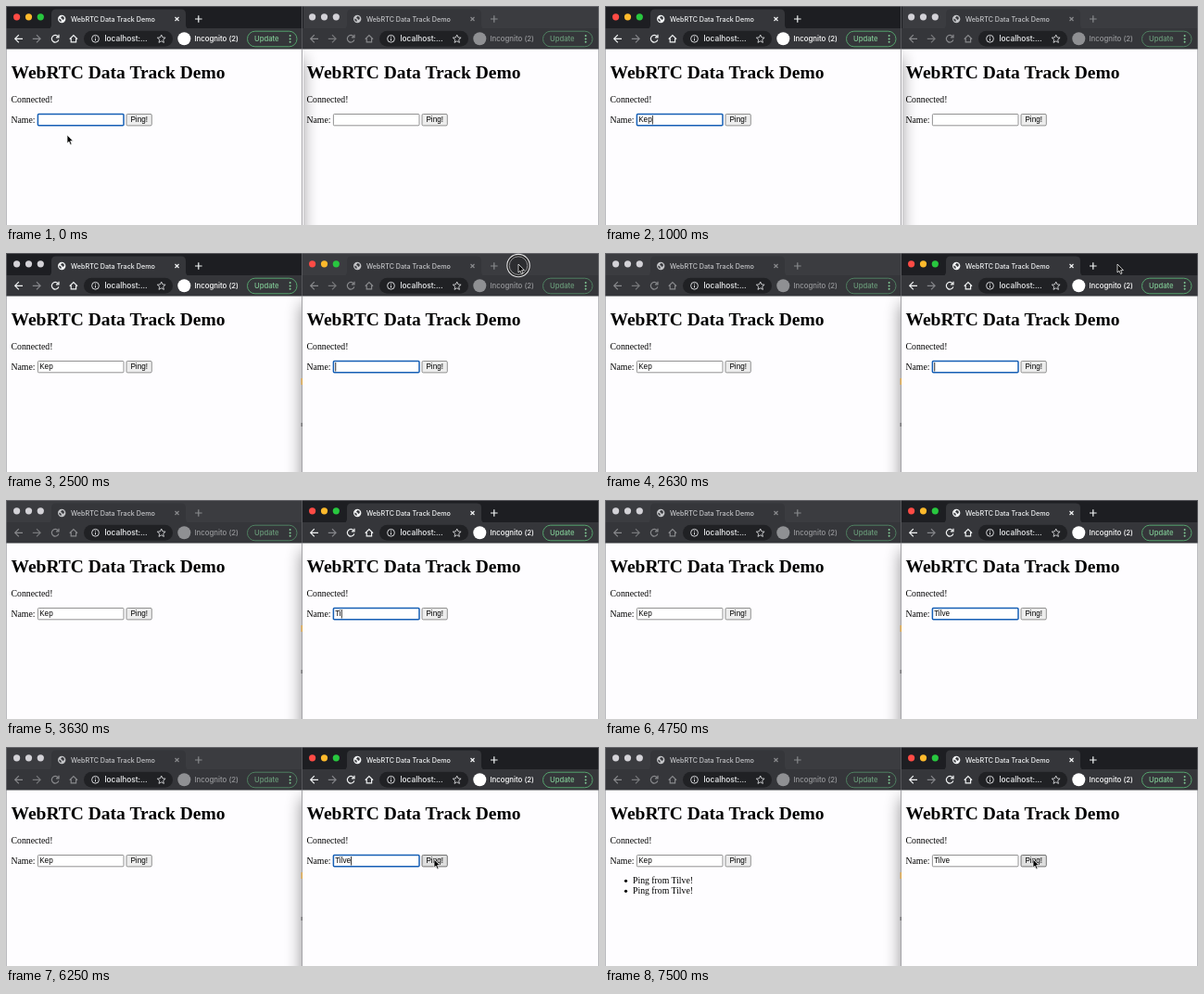
Write an HTML page that moves like this. It is 640 px wide and 236 px high and loops after 8 s.

```html
<!DOCTYPE html>
<html lang="en">
<head>
<meta charset="utf-8">
<title>WebRTC Data Track Demo</title>
<style>
  html, body { margin: 0; width: 100%; height: 100%; overflow: hidden; background: #fefdff; }
  svg { display: block; width: 640px; height: 236px; }
  text { white-space: pre; }
  .ui { font-family: Inter, Roboto, sans-serif; font-weight: 500; }
  .page { font: 9.75px "Liberation Serif", "Times New Roman", serif; fill: #000; }
  .page .h1 { font-size: 19.5px; font-weight: 700; }
  .page .ctl { font: 8.15px "Liberation Sans", Arial, sans-serif; }

  .win { --strip: #3b3c40; --tab: #35363a; --title: #c3c4c7; --icon: #88898c; --dim: #77787b;
         --badge: #8f9093; --label: #97989b; --green: #6a9a79; --edge: #4f8061; }
  .win.active { --strip: #1d1e22; --title: #f1f3f4; --icon: #f1f3f4; --dim: #85868a;
         --badge: #fff; --label: #fff; --green: #81c995; --edge: #55a36d; }
  .strip { fill: var(--strip); }
  .tab { fill: var(--tab); }
  .title { fill: var(--title); font-size: 7.2px; }
  .line { fill: none; stroke: var(--icon); stroke-width: 1.2; }
  .line.dim { stroke: var(--dim); }
  .label { fill: var(--label); font-size: 7.8px; }
  .green { fill: var(--green); font-size: 7.7px; }
  .light { fill: #d3d2d7; }
  .front .light.r { fill: #fe4b45; }
  .front .light.y { fill: #fdb92c; }
  .front .light.g { fill: #28c73f; }
  .shadow { display: none; }
  .front .shadow { display: inline; }
  .box { fill: #fff; stroke: #767676; stroke-width: .8; }
  .focus .box { stroke: #165fb5; stroke-width: 1.5; }
  .btn { fill: #ededed; stroke: #767676; stroke-width: .8; }
  .hover .btn { fill: #dedede; stroke: #555; }
  .press .btn { fill: #cfcfcf; }
</style>
</head>
<body>
<svg id="stage" viewBox="0 0 640 236" xmlns="http://www.w3.org/2000/svg">
  <defs>
    <filter id="soft" x="-20%" y="-20%" width="140%" height="140%"><feGaussianBlur stdDeviation="9"/></filter>
    <clipPath id="pane"><rect width="321" height="236"/></clipPath>
  </defs>
  <rect width="640" height="236" fill="#fefdff"/>
  <g id="windows"></g>
  <g id="seam">
    <rect x="319" y="0" width="1" height="46.5" fill="#55565a"/>
    <rect x="319" y="46.5" width="1" height="189.5" fill="#a3a2a6"/>
    <g id="specks">
      <rect x="318.6" y="135" width="1.4" height="7" fill="#dca648"/>
      <rect x="318.6" y="183" width="1.4" height="4" fill="#6d6c70"/>
    </g>
  </g>
  <rect x=".5" y=".5" width="639" height="240" fill="none" stroke="#85868a" stroke-opacity=".55"/>
  <g id="pointer">
    <g id="ring" fill="none">
      <circle cy="1.6" r="11" fill="#000" fill-opacity=".25" stroke="#222" stroke-width="3"/>
      <circle cy="1.6" r="12.2" stroke="#e4e4e6" stroke-width="1.1"/>
      <circle cy="1.6" r="9.8" stroke="#b4b4b8" stroke-width=".8"/>
    </g>
    <path d="M0 0V9L2 7.2 3.5 10.6 5 10 3.6 6.6H6.4Z" fill="#000" stroke="#eee" stroke-width=".8"/>
  </g>
</svg>
<script>
const LOOP = 8000, TICK = 125;
const $ = id => document.getElementById(id);
const NS = 'http://www.w3.org/2000/svg';

const light = (x, c) => `<circle class="light ${c}" cx="${x}" cy="11.8" r="3.6"/>`;
const line = (d, extra = '') => `<path class="line ${extra}" d="${d}"/>`;
const dot = y => `<circle cx="306.6" cy="${y}" r="1"/>`;
const item = (y, name) => `<g class="item"><circle cx="22.5" cy="${y - 2.7}" r="1.6"/>
  <text x="30" y="${y}">Ping from ${name}!</text></g>`;

const chrome = () => `
  <rect class="strip" width="321" height="25"/>
  ${light(11.6, 'r')}${light(24.5, 'y')}${light(37.3, 'g')}
  <path class="tab" d="M44 25q5 0 5-5V8.5q0-5 5-5H189q5 0 5 5V20q0 5 5 5Z"/>
  <rect class="tab" y="24" width="321" height="22.5"/>
  <circle cx="60.2" cy="14" r="4.2" fill="var(--title)"/>
  <path d="M57 13.5l2.6 1.2v2.4q-2.4-.8-2.600-3.600ZM60.200 11l2.300.8.300 2.200-1.600 1-.8-1.600-1.400-.4Z" fill="var(--tab)"/>
  <text class="ui title" x="70" y="16.700">WebRTC Data Track Demo</text>
  <circle class="halo" cx="184.500" cy="14" r="5" fill="#77787c"/>
  ${line('M182.500 12l4 4m0-4l-4 4')}
  ${line('M204 14h7.600M207.800 10.200v7.600')}
  ${line('M18 35.300H9.800M13.800 31.200l-4.100 4.100 4.100 4.100')}
  ${line('M28.800 35.300H37M33 31.200l4.100 4.100L33 39.400', 'dim')}
  ${line('M56.200 33A3.800 3.800 0 1 0 56.800 36.300M57 30.800v3h-3')}
  ${line('M68.700 35.600l4.200-4 4.200 4M70.200 34.800v4h5.400v-4')}
  <rect x="84" y="26.800" width="96" height="17" rx="8.500" fill="#202124"/>
  <g fill="none" stroke="#d5d6d9">
    <circle cx="96.500" cy="35.300" r="3.900"/>
    <path d="M96.500 34.800v2.700M96.500 32.800v1"/>
    <path d="M167.700 31l1.300 2.900 3.100.3-2.400 2.100.7 3.100-2.700-1.600-2.700 1.600.7-3.100-2.400-2.100 3.100-.3Z" stroke-width=".9"/>
  </g>
  <text class="ui" x="106.500" y="38.200" font-size="8.300" fill="#eef0f2">localhost:…</text>
  <circle cx="192.300" cy="35.300" r="7" fill="var(--badge)"/>
  <text class="ui label" x="203.500" y="38.100">Incognito (2)</text>
  <rect x="260.500" y="27.200" width="53.500" height="16.600" rx="8.300" fill="none" stroke="var(--edge)"/>
  <text class="ui green" x="268" y="38.100">Update</text>
  <g fill="#81c995">${dot(32)}${dot(35.4)}${dot(38.8)}</g>`;

const page = (items = '') => `
  <g class="page">
    <text class="h1" x="5.500" y="77.500">WebRTC Data Track Demo</text>
    <text x="5.500" y="104">Connected!</text>
    <text x="5.500" y="125.500">Name:</text>
    <g class="field">
      <rect class="box" x="34.400" y="116.500" width="92.600" height="12.300" rx="1"/>
      <text class="ctl value" x="36.200" y="125.400"></text>
      <rect class="caret" y="118" width=".8" height="9.500"/>
    </g>
    <g class="button">
      <rect class="btn" x="130" y="116.500" width="27.300" height="12.400" rx="1.300"/>
      <text class="ctl" x="143.700" y="125.400" text-anchor="middle">Ping!</text>
    </g>
    ${items}
  </g>`;

function makeWindow(x, name, keys, focusAt, blurAt, items) {
  const g = document.createElementNS(NS, 'g');
  g.setAttribute('transform', `translate(${x} 0)`);
  g.innerHTML = `<rect class="shadow" x="0" y="55" width="320" height="260" fill="#000" opacity=".42" filter="url(#soft)"/>
    <g clip-path="url(#pane)"><rect width="321" height="236" fill="#fefdff"/>${chrome()}${page(items)}</g>`;
  $('windows').append(g);
  const q = s => g.querySelector(s);
  return { g, name, keys, focusAt, blurAt, field: q('.field'), value: q('.value'),
           caret: q('.caret'), button: q('.button'), halo: q('.halo') };
}

// All times below are in ticks of 125 ms.
const FRONT = 20, THEME = 21;
const CLICKS = [52, 59], RINGS = [19, 20, ...CLICKS];
const left = makeWindow(0, 'Kep', [3, 5, 7], 1, FRONT, item(147, 'Tilve') + item(158, 'Tilve'));
const right = makeWindow(319, 'Tilve', [27, 29, 31, 32, 34], FRONT, CLICKS[0]);
const items = [...left.g.querySelectorAll('.item')];

const PATH = [[0, 66, 139], [11, 66, 139], [15, 513, 14], [17, 553, 12],
              [39, 553, 12], [45, 464, 119], [50, 462, 121], [64, 462, 121]];
const HIDDEN = [[3, 11], [27, 40]];

const show = (el, on) => { el.style.display = on ? '' : 'none'; };

function pointerAt(k) {
  const i = PATH.findIndex(p => p[0] > k);
  const [t0, x0, y0] = PATH[i - 1], [t1, x1, y1] = PATH[i];
  const u = (k - t0) / (t1 - t0), e = u * u * (3 - 2 * u);
  return [x0 + (x1 - x0) * e, y0 + (y1 - y0) * e];
}

function drawField(w, k) {
  const typed = w.keys.filter(t => t <= k).length;
  const last = typed ? w.keys[typed - 1] : w.focusAt;
  const caretOn = k >= w.focusAt && k < w.blurAt && Math.floor((k - last) / 4) % 2 === 0;
  const focused = k < w.blurAt && (w === left || k >= w.focusAt);
  w.value.textContent = w.name.slice(0, typed);
  w.caret.setAttribute('x', 36.4 + (typed ? w.value.getComputedTextLength() : 0));
  show(w.caret, caretOn);
  w.field.classList.toggle('focus', focused);
}

function draw(k) {
  const front = k < FRONT ? left : right, themed = k < THEME ? left : right;
  for (const w of [left, right]) {
    w.g.setAttribute('class', 'win' + (w === front ? ' front' : '') + (w === themed ? ' active' : ''));
    drawField(w, k);
  }
  if ($('windows').lastChild !== front.g) $('windows').append(front.g);
  show($('specks'), front === right);
  show(left.halo, false);
  show(right.halo, k === 15);
  right.button.classList.toggle('hover', k >= 45);
  right.button.classList.toggle('press', CLICKS.includes(k));
  items.forEach((el, i) => show(el, k > CLICKS[i]));

  const [x, y] = pointerAt(k);
  $('pointer').setAttribute('transform', `translate(${x.toFixed(1)} ${y.toFixed(1)})`);
  show($('pointer'), !HIDDEN.some(([a, b]) => k >= a && k < b));
  show($('ring'), RINGS.includes(k));
}

const start = performance.now();
let shown = -1;
function tick() {
  const k = Math.floor((performance.now() - start) % LOOP / TICK);
  if (k !== shown) draw(shown = k);
  requestAnimationFrame(tick);
}
tick();
</script>
</body>
</html>
```
